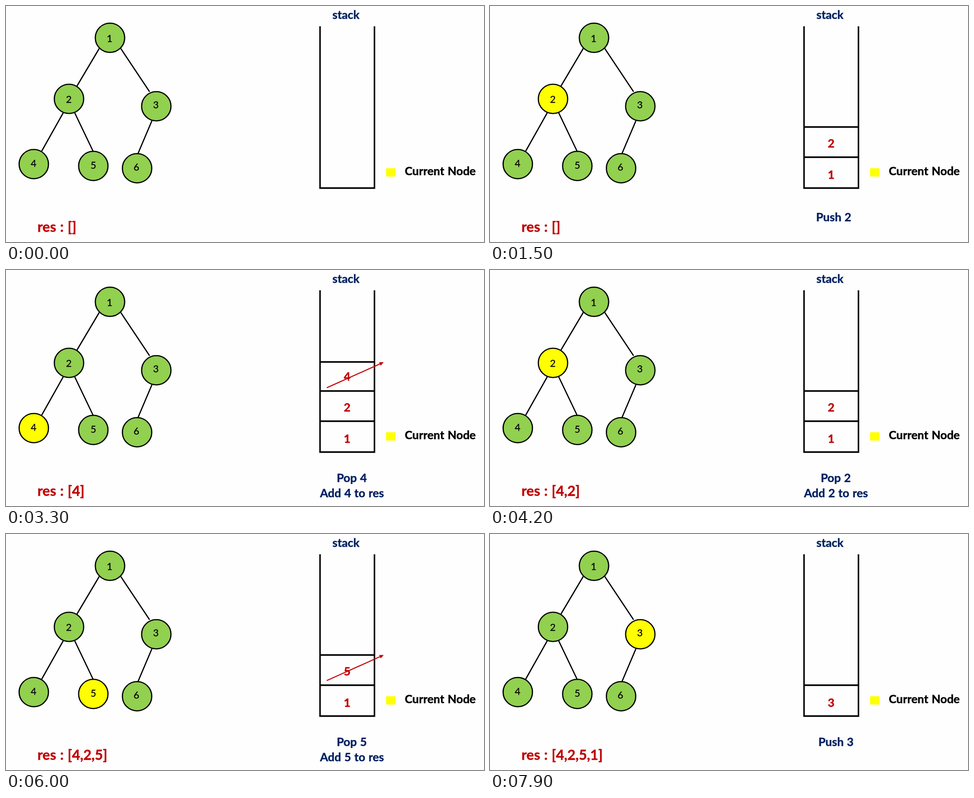
Animation, 1032 px wide and 512 px high, one loop 8000 ms. Source, as an HTML page:

```html
<!DOCTYPE html>
<html lang="en">
<head>
<meta charset="utf-8">
<title>Inorder traversal with a stack</title>
<style>
  html, body { margin: 0; height: 100%; overflow: hidden; background: #fefefe; }
  svg { display: block; width: 100vw; height: 100vh; }
  text { font: bold 25px Lato, sans-serif; word-spacing: 1px; stroke: #000; stroke-width: .5; }
  .mid { text-anchor: middle; }
  .line { fill: none; stroke: #000; stroke-width: 3.3; }
  .thin { stroke: #000; stroke-width: 2.6; }
  .label { font-weight: 400; font-size: 21px; stroke-width: .3; }
  .blue { fill: #002060; stroke: #002060; }
  .red { fill: #c00000; stroke: #c00000; }
  .res { font-size: 30.3px; }
</style>
</head>
<body>
<svg viewBox="0 0 1032 512">
  <path class="line thin" d="M202 91L153 174M247 91L310 186M124 231L77 315M148 231L188 315M315 249L285 320"/>
  <g id="tree"></g>
  <text class="blue mid" x="734" y="28">stack</text>
  <path class="line" d="M678 44V395H795.5V44"/>
  <rect x="820.5" y="352" width="20.5" height="18" fill="#ff0"/>
  <text x="861" y="367">Current Node</text>
  <g id="scene"></g>
</svg>
<script>
const LOOP = 8000;

// Circle centre, then label centre
const nodes = [
  [224.5, 69, 223.5, 70], [136, 201.5, 135.5, 202], [324.5, 217.5, 323.5, 214],
  [60, 343, 59.5, 341], [188.5, 347, 188.5, 345], [283, 352, 281.5, 349]
];

// Stack cells from the bottom up: top edge, digit baseline, arrow tip
const cells = [[328, 375, 333], [262.5, 307, 262.5], [199.5, 240, 200]];

const steps = [
  { at: 0, stack: [], res: "" },
  { at: 500, node: 1, stack: [1], push: 1, low: true, res: "" },
  { at: 1500, node: 2, stack: [1, 2], push: 2, low: true, res: "" },
  { at: 2400, node: 4, stack: [1, 2, 4], push: 4, low: true, res: "" },
  { at: 3300, node: 4, stack: [1, 2, 4], pop: 4, arrow: true, res: "4" },
  { at: 4200, node: 2, stack: [1, 2], pop: 2, res: "4,2" },
  { at: 5100, node: 5, stack: [1, 5], push: 5, res: "4,2" },
  { at: 6000, node: 5, stack: [1, 5], pop: 5, arrow: true, res: "4,2,5" },
  { at: 7000, node: 1, stack: [1], pop: 1, arrow: true, res: "4,2,5,1" },
  { at: 7900, node: 3, stack: [3], push: 3, res: "4,2,5,1" }
];

const tree = document.getElementById("tree");
const scene = document.getElementById("scene");
const text = (x, y, cls, s) => `<text x="${x}" y="${y}" class="${cls}">${s}</text>`;

tree.innerHTML = nodes.map(([x, y, tx, ty], i) =>
  `<circle class="thin" cx="${x}" cy="${y}" r="31.7"/>` + text(tx, ty + 7.7, "label mid", i + 1)).join("");
const circles = tree.querySelectorAll("circle");

function arrow(y) {
  return `<g transform="translate(815.5 ${y}) rotate(-24.3)" class="red">
    <path d="M-135 0H-6" stroke-width="2.3"/><path d="M0 0L-9 -4.2V4.2Z" stroke="none"/></g>`;
}

function caption({ push, pop, low }) {
  if (push) return text(low ? 742 : 747, low ? 467 : 460, "blue mid", "Push " + push);
  if (pop) return text(746.5, 460, "blue mid", "Pop " + pop) + text(747, 493, "blue mid", `Add ${pop} to res`);
  return "";
}

function show(step) {
  circles.forEach((c, i) => c.setAttribute("fill", i + 1 === step.node ? "#ff0" : "#92d050"));
  const rows = step.stack.map((n, i) =>
    `<path class="line" d="M678 ${cells[i][0]}H795.5"/>` + text(736.5, cells[i][1], "red mid", n));
  scene.innerHTML = rows.join("") + caption(step)
    + text(68, 490, "red res", `res : [${step.res}]`)
    + (step.arrow ? arrow(cells[step.stack.length - 1][2]) : "");
}

let shown;
function tick() {
  const t = performance.now() % LOOP;
  const step = steps.findLast(s => s.at <= t);
  if (step !== shown) show(shown = step);
  requestAnimationFrame(tick);
}
tick();
</script>
</body>
</html>
```
